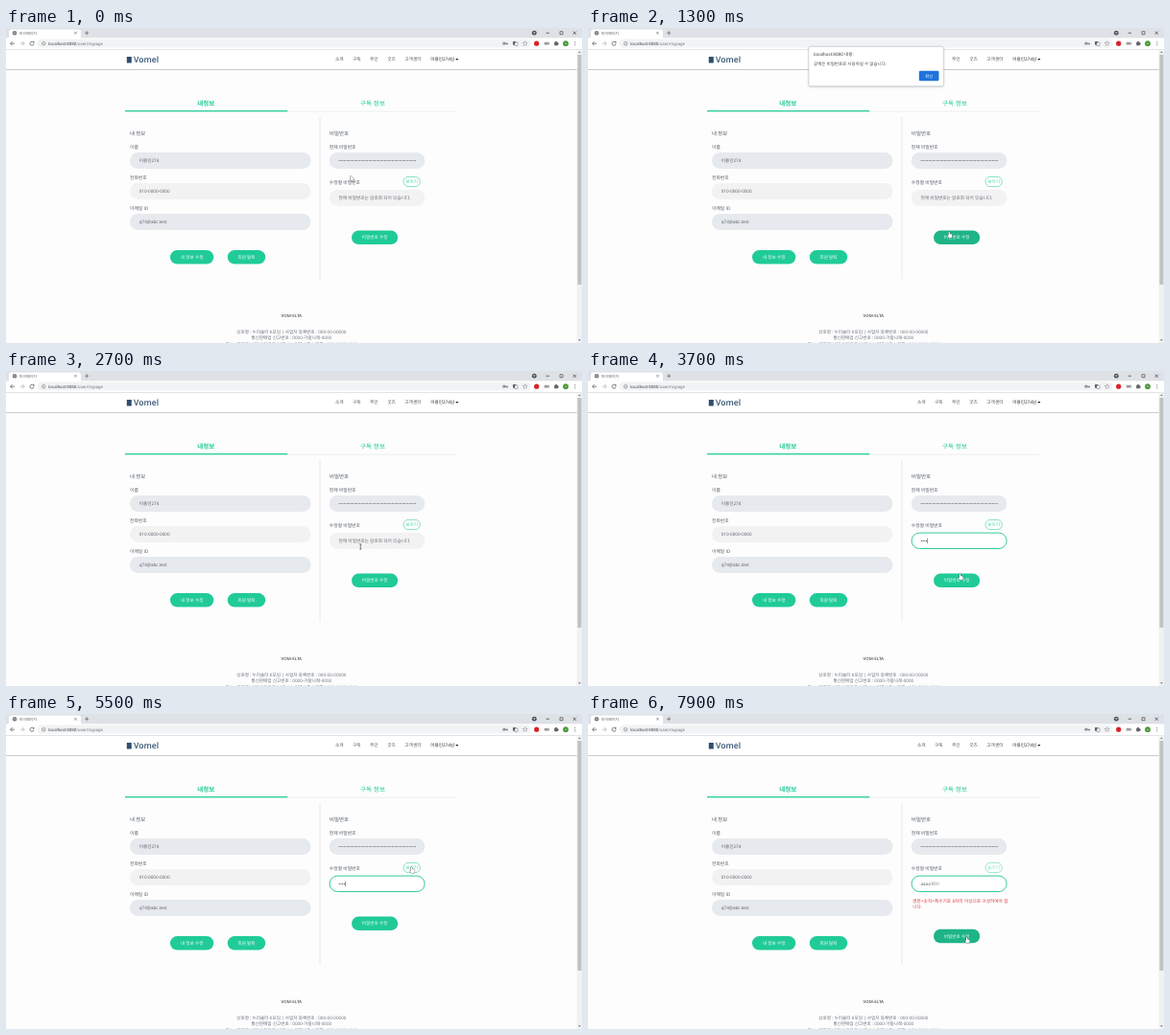
Write an HTML page with a canvas that moves like this. It is 600x329 px and loops after 8000 ms.

```html
<!DOCTYPE html>
<html lang="ko">
<head>
<meta charset="utf-8">
<title>마이페이지</title>
<style>
html, body { margin: 0; width: 100%; height: 100%; overflow: hidden; background: #fff; }
canvas { display: block; width: 600px; height: 329px; }
</style>
</head>
<body>
<canvas id="stage"></canvas>
<script>
const W = 600, H = 329, LOOP = 8000, STEP = 100;
const canvas = document.getElementById('stage');
const dpr = window.devicePixelRatio || 1;
canvas.width = W * dpr;
canvas.height = H * dpr;
const c = canvas.getContext('2d');

const GREEN = '#20cb98', DARK_GREEN = '#1fb487';
const GREY = '#626a74', LABEL = '#4f5864', VALUE = '#525b66';
const PAGE = '"Open Sans", "Noto Sans CJK KR", "Noto Sans CJK", sans-serif';
const CHROME = 'Roboto, "Noto Sans CJK KR", "Noto Sans CJK", sans-serif';
const USER = '이용인274';

// y is the optical middle of the line
function text(s, x, y, size, color = GREY, { align = 'left', weight = 400, family = PAGE } = {}) {
  c.font = `${weight} ${size}px ${family}`;
  c.textAlign = align;
  c.fillStyle = color;
  c.fillText(s, x, y + size * 0.36);
}

function box(x, y, w, h, fill) {
  c.fillStyle = fill;
  c.fillRect(x, y, w, h);
}

function pill(x, y, w, h, r, fill, stroke, line = 1) {
  c.beginPath();
  c.roundRect(x, y, w, h, r);
  if (fill) { c.fillStyle = fill; c.fill(); }
  if (stroke) { c.strokeStyle = stroke; c.lineWidth = line; c.stroke(); }
}

function dot(x, y, r, fill) {
  c.beginPath();
  c.arc(x, y, r, 0, Math.PI * 2);
  c.fillStyle = fill;
  c.fill();
}

function ring(x, y, r, color, line = 0.7, from = 0, to = Math.PI * 2) {
  c.beginPath();
  c.arc(x, y, r, from, to);
  c.strokeStyle = color;
  c.lineWidth = line;
  c.stroke();
}

function lines(color, width, ...paths) {
  c.strokeStyle = color;
  c.lineWidth = width;
  c.beginPath();
  for (const p of paths)
    for (let i = 0; i < p.length; i += 2) i ? c.lineTo(p[i], p[i + 1]) : c.moveTo(p[0], p[1]);
  c.stroke();
}

function poly(p, fill, stroke, line = 0.5) {
  c.beginPath();
  for (let i = 0; i < p.length; i += 2) c.lineTo(p[i], p[i + 1]);
  c.closePath();
  if (stroke) { c.strokeStyle = stroke; c.lineWidth = line * 2; c.stroke(); }
  c.fillStyle = fill;
  c.fill();
}

function browser() {
  const ink = '#5f6368';
  box(0, 0, W, 10.5, '#dee1e6');
  pill(3, 1.5, 75, 12, 2.5, '#fff');
  dot(9, 5.2, 2.2, ink);
  lines('#fff', 0.4, [7, 5.2, 11, 5.2], [9, 3.2, 9, 7.2]);
  text('마이페이지', 14, 5.3, 3.9, '#55595e', { family: CHROME });
  lines(ink, 0.6, [71.2, 3.9, 73.8, 6.5], [73.8, 3.9, 71.2, 6.5]);
  lines(ink, 0.7, [82.2, 5.2, 86.2, 5.2], [84.2, 3.2, 84.2, 7.2]);
  dot(550.3, 5.2, 2.4, '#4b4f54');
  poly([549.1, 4.6, 551.5, 4.6, 550.3, 6.1], '#fff');
  lines('#333', 0.7, [562.5, 5.2, 566, 5.2], [590.7, 3.6, 593.9, 6.8], [593.9, 3.6, 590.7, 6.8]);
  pill(577, 3.7, 3, 3, 0, null, '#333', 0.6);

  box(0, 10.5, W, 12, '#fff');
  pill(32.5, 11.6, 514, 9, 4.5, '#f1f3f4');
  lines(ink, 0.8, [9, 16.2, 4.6, 16.2], [6.7, 14, 4.6, 16.2, 6.7, 18.4]);
  lines('#b4b7bb', 0.8, [14.8, 16.2, 19.2, 16.2], [17.1, 14, 19.2, 16.2, 17.1, 18.4]);
  ring(27, 16.2, 2, ink, 0.8, 0.2, 5.4);
  box(28.1, 14, 1.3, 1.6, ink);
  ring(39.2, 16.2, 1.8, ink, 0.5);
  lines(ink, 0.5, [39.2, 15.8, 39.2, 17.3]);
  const url = { family: CHROME };
  text('localhost:8080', 44.3, 16.1, 4.4, '#43474c', url);
  const w = c.measureText('localhost:8080').width;
  text('/user/mypage', 44.3 + w, 16.1, 4.4, '#74787d', url);

  ring(518.8, 16.2, 1.1, ink, 0.9);
  lines(ink, 0.9, [519.8, 16.2, 522.8, 16.2], [522, 16.2, 522, 17.5]);
  pill(528, 13.9, 3.3, 3.8, 0.4, ink);
  pill(530, 15, 3, 3.5, 0.4, '#fff', ink, 0.5);
  const star = [];
  for (let i = 0; i < 10; i++) {
    const r = i % 2 ? 1 : 2.3, a = i * Math.PI / 5 - Math.PI / 2;
    star.push(540.7 + r * Math.cos(a), 16.2 + r * Math.sin(a));
  }
  poly(star, '#f1f3f4', ink, 0.35);
  dot(552.7, 16.2, 2.6, '#d8232a');
  ring(562.1, 16.2, 1.1, '#4a4d51', 0.7);
  ring(564.5, 16.2, 1.1, '#4a4d51', 0.7);
  pill(571.2, 14.8, 3.6, 3.5, 0.3, ink);
  dot(573, 14.6, 0.9, ink);
  dot(574.9, 16.5, 0.9, ink);
  dot(583, 16.2, 2.9, '#4f9a3c');
  box(582.2, 15.8, 1.7, 0.7, '#d5e8cf');
  for (const y of [14.5, 16.2, 17.9]) dot(592.8, y, 0.5, ink);
  box(0, 22, W, 0.7, '#d9dbde');
}

function scrollbar() {
  box(594.7, 22.6, 5.3, H, '#f1f1f1');
  box(595.4, 28, 4, 240, '#c1c1c1');
  poly([596, 26, 598.8, 26, 597.4, 24.4], '#777');
  poly([596, 325.3, 598.8, 325.3, 597.4, 326.9], '#777');
}

function nav() {
  box(0, 22.6, 594.7, 20.4, '#fff');
  box(0, 43, 594.7, 0.9, '#c9ccd0');
  pill(125.8, 30, 5, 6.5, 0, '#304f70');
  text('Vomel', 133, 33.2, 8.7, '#304f70', { weight: 600 });
  const items = [['소개', 343], ['구독', 361], ['주인', 379], ['굿즈', 397.3], ['고객센터', 415.3]];
  for (const [s, x] of items) text(s, x, 32.8, 4.7, '#4a4e53');
  text(USER + '님', 442.3, 32.8, 4.6, '#1a1a1a', { weight: 500 });
  poly([468.2, 32, 471.4, 32, 469.8, 33.8], '#1a1a1a');
}

function button(label, x, y, w, h, fill = GREEN) {
  pill(x, y, w, h, h / 2, fill);
  text(label, x + w / 2, y + h / 2, 4.6, '#fff', { align: 'center' });
}

function field(label, value, x, y, w, fill) {
  text(label, x, y - 6, 4.8, LABEL);
  pill(x, y, w, 16.8, 8.4, fill);
  if (value) text(value, x + 9.7, y + 8.4, 4.6, VALUE);
}

function bullets(x, y, n, gap, r) {
  for (let i = 0; i < n; i++) dot(x + i * gap, y, r, '#495057');
}

function page() {
  box(0, 43.9, 594.7, H, '#fdfdfd');
  const mid = { align: 'center' };
  text('내정보', 208.3, 78.3, 6.6, GREEN, { align: 'center', weight: 700 });
  text('구독 정보', 382, 78.3, 6.6, GREEN, mid);
  box(293, 86.8, 177, 0.6, '#dfe3e6');
  box(124, 86.1, 169.3, 1.3, GREEN);
  box(326.7, 93, 0.7, 169, '#e0e2e5');

  text('내 정보', 129, 110.3, 5.4, LABEL);
  text('비밀번호', 337, 110.3, 5.4, LABEL);
  field('이름', USER, 129, 130.1, 188.5, '#e6e9ed');
  field('전화번호', '010-0000-0000', 129, 162.1, 188.5, '#f2f2f2');
  field('이메일 ID', 'q74@abc.test', 129, 194.1, 188.5, '#e6e9ed');
  field('현재 비밀번호', '', 336.8, 130.1, 99.5, '#e6e9ed');
  bullets(347, 138.5, 60, 1.35, 0.48);
  button('내 정보 수정', 171, 232, 45.3, 14.6);
  button('회원 탈퇴', 230.8, 232, 39.4, 14.6);

  text('VOM-ELTA', 297.3, 300.8, 4.4, '#4d5257', { align: 'center', weight: 600 });
  text('상호명 : 누리솔터 K모임 | 사업자 등록번호 : 000-00-00000', 297.3, 317, 4.6, GREY, mid);
  text('통신판매업 신고번호 : 0000-가람나래-0000', 297.3, 323.7, 4.6, GREY, mid);
  text('주소 : 가람도 나래시 다온로 00길 0 누리동 0층 | 전화 : 000-0000-0000', 297.3, 330.4, 4.6, GREY, mid);
}

const firstAlert = t => t >= 800 && t < 1900;
const secondAlert = t => t >= 4000 && t < 4900;

function passwordForm(t) {
  const focused = t >= 2900;
  const shown = t >= 5700;
  const warned = t >= 6300;
  const typed = 'aaaa101!'.slice(0, typeTimes.filter(k => t >= k).length);

  text('수정할 비밀번호', 336.8, 161, 4.8, LABEL);
  pill(414, 155.4, 17.3, 10.2, 5.1, '#fff', shown ? '#74dcbd' : '#4fd3ab', 0.7);
  text(shown ? '숨기기' : '보이기', 422.7, 160.5, 4.6, shown ? '#6fdcbc' : '#35cfa2', { align: 'center' });

  // the ring pales while an alert holds the focus
  if (focused) pill(337.1, 169.1, 99, 16.4, 8.2, '#fff', secondAlert(t) ? '#8fdfc8' : '#36c9a0', 1);
  else pill(336.8, 168.9, 99.5, 16.8, 8.4, '#f2f2f2');

  let caret = 346.6;
  if (!typed) {
    text('현재 비밀번호는 암호화 되어 있습니다.', 346.5, 177.2, 4.7, '#656d76');
  } else if (shown) {
    text(typed, 346.5, 177.2, 4.6, VALUE);
    caret += c.measureText(typed).width;
  } else {
    bullets(347.3, 177.3, typed.length, 1.7, 0.6);
    caret += typed.length * 1.7;
  }
  const typing = focused && !secondAlert(t) && t < 7800;
  if (typing && (t % 1000 >= 500 || t < 3500)) box(caret, 174.6, 0.5, 5.4, '#333');

  if (warned) {
    text('영문+숫자+특수기호 8자리 이상으로 구성하여야 합', 338.3, 195, 4.7, '#dc3545');
    text('니다.', 338.3, 201.3, 4.7, '#dc3545');
  }
  const hover = (t >= 500 && t < 1900) || (t >= 3800 && t < 4900) || t >= 7700;
  button('비밀번호 수정', 360, warned ? 224.7 : 211.5, 48.2, 14.6, hover ? DARK_GREEN : GREEN);
}

function dialog(message, y) {
  c.save();
  c.shadowColor = 'rgba(0,0,0,.28)';
  c.shadowBlur = 2.5 * dpr;
  c.shadowOffsetY = 0.6 * dpr;
  pill(230, y, 140.3, 41.3, 1.5, '#fff');
  c.restore();
  pill(230, y, 140.3, 41.3, 1.5, null, '#bfc2c5', 0.5);
  const o = { family: CHROME };
  text('localhost:8080 내용:', 235, y + 8.4, 4.7, '#3f4347', o);
  text(message, 235, y + 17.6, 4.5, '#44484c', o);
  pill(344.8, y + 25.4, 20.7, 10.5, 1.2, '#1f73dc');
  text('확인', 355.2, y + 30.7, 4.3, '#fff', { align: 'center', family: CHROME });
}

// pointer stops: time, x, y, shape worn while leaving this stop
const stops = [
  [0, 359, 154.5, 'arrow'],
  [500, 375.7, 213, 'hand'],
  [1300, 375.7, 213, 'hand'],
  [1400, 375, 204, 'arrow'],
  [1800, 352, 48, 'arrow'],
  [2000, 352, 48, 'arrow'],
  [2600, 369.3, 183.5, 'beam'],
  [3400, 369.3, 183.5, 'beam'],
  [3700, 387, 212, 'hand'],
  [4100, 387, 213, 'arrow'],
  [4600, 347.8, 47.2, 'arrow'],
  [5000, 347.8, 47.2, 'arrow'],
  [5500, 422, 160, 'hand'],
  [5800, 422, 160, 'arrow'],
  [6100, 395, 179, 'beam'],
  [6300, 395, 179, 'arrow'],
  [6600, 401, 191.5, 'arrow'],
  [7300, 401, 191.5, 'arrow'],
  [7800, 394, 233.2, 'hand']
];
const typeTimes = [3100, 3200, 3300, 3400, 6300, 6500, 7000, 7200];

function pointer(t) {
  let i = stops.length - 1;
  while (stops[i][0] > t) i--;
  const a = stops[i], b = stops[i + 1] || a;
  const p = b === a ? 0 : (t - a[0]) / (b[0] - a[0]);
  const e = p * p * (3 - 2 * p);
  c.save();
  c.translate(a[1] + (b[1] - a[1]) * e, a[2] + (b[2] - a[2]) * e);
  if (a[3] === 'arrow') {
    poly([0, 0, 0, 5.3, 1.2, 4.2, 2, 6, 2.9, 5.6, 2.1, 3.9, 3.7, 3.8], '#fff', '#222', 0.3);
  } else if (a[3] === 'hand') {
    poly([-0.1, 0, 1, 0, 1.2, 2, 3.6, 2.6, 3.7, 4.3, 3, 6.2, 0.4, 6.2, -1.4, 3.8, -1, 3.2, -0.1, 3.9], '#fff', '#222', 0.3);
  } else {
    lines('#333', 0.6, [-1, -2.6, 1, -2.6], [0, -2.6, 0, 2.6], [-1, 2.6, 1, 2.6]);
  }
  c.restore();
}

function draw(now) {
  const t = Math.floor((now % LOOP) / STEP) * STEP;
  c.setTransform(dpr, 0, 0, dpr, 0, 0);
  c.textRendering = 'geometricPrecision';
  page();
  passwordForm(t);
  nav();
  browser();
  scrollbar();
  if (firstAlert(t)) dialog('공백은 비밀번호로 사용하실 수 없습니다.', 19.4);
  if (secondAlert(t)) dialog('수정하실 수 없습니다. 비밀번호를 확인하세요.', 20.7);
  pointer(t);
}

const start = performance.now();
function tick() {
  draw(performance.now() - start);
  requestAnimationFrame(tick);
}
tick();
</script>
</body>
</html>
```
